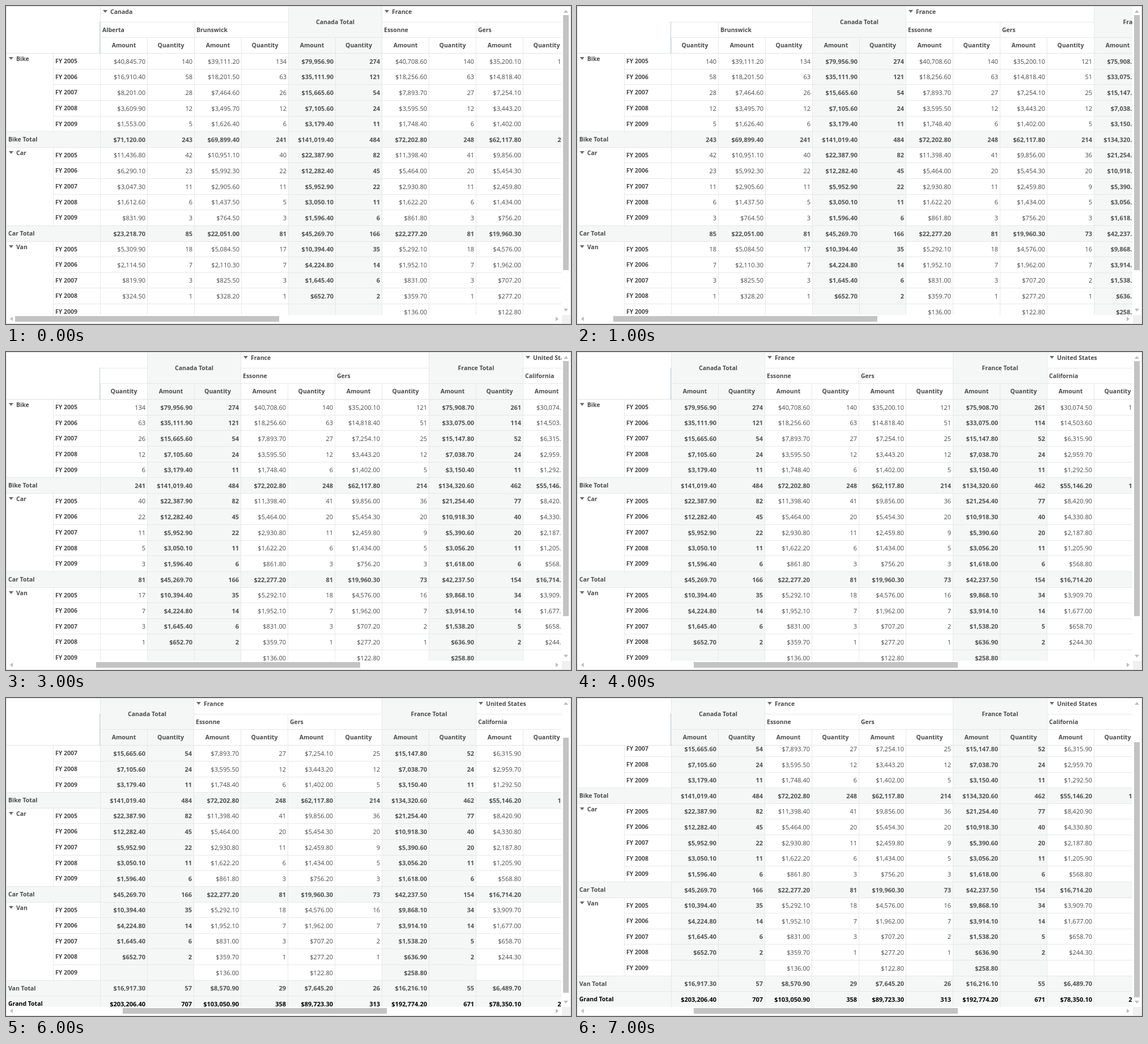
Write an HTML page that moves like this. It is 997x561 px and loops after 8000 ms.

```html
<!DOCTYPE html>
<html lang="en">
<head>
<meta charset="utf-8">
<title>Pivot grid</title>
<style>
html, body { margin: 0; width: 100%; height: 100%; overflow: hidden; background: #fff; }
#grid { position: absolute; left: 0; top: 0; width: 997px; height: 561px; overflow: hidden; background: #fff;
  font: 11px "Open Sans", "Noto Sans", sans-serif; color: #484848; }
#grid * { box-sizing: border-box; }
.pane, .layer, .cell, .bar, .arrow, .line { position: absolute; }
.pane { overflow: hidden; background: #fff; }
.layer { left: 0; top: 0; }
.cell { border: solid #e6e8e7; border-width: 1px 0 0 1px; background: #fff; white-space: nowrap; overflow: hidden; }
.num { text-align: right; padding-right: 3px; }
.mid { text-align: center; }
.left { padding-left: 3px; }
.label { font-size: 10.5px; font-weight: 700; color: #4a4a4a; }
.tint { background: #f5f7f6; }
.sum { font-weight: 700; color: #525252; }
.grand { font-weight: 700; color: #000; }
.fold { padding-left: 17px; }
.fold::before { content: ""; position: absolute; left: 4px; top: 6px;
  border: solid transparent; border-width: 5px 4.5px 0; border-top-color: #6a6a6a; }
.bar { background: #c3c3c3; }
.arrow { border: 4px solid transparent; }
#frame { position: absolute; inset: 0; border: 1px solid #dcdcdc; }
</style>
</head>
<body>
<div id="grid"></div>
<script>
const COL = 82.9, ROW = 27.63, LOOP = 8000, STEPS = 8;
const colX = i => Math.round(i * COL);
const rowY = i => Math.round(i * ROW);
const grid = document.getElementById('grid');

function box(parent, cls, x, y, w, h, text = '') {
  const el = document.createElement('div');
  el.className = cls;
  Object.assign(el.style, { left: x + 'px', top: y + 'px', width: w + 'px', height: h + 'px' });
  el.textContent = text;
  parent.append(el);
  return el;
}

function cell(parent, cls, col, row, cols, rows, text, lineHeight) {
  const x = colX(col), y = rowY(row), w = colX(col + cols) - x, h = rowY(row + rows) - y;
  const el = box(parent, 'cell ' + cls, x, y, w, h, text);
  el.style.lineHeight = (lineHeight || h - 1) + 'px';
}

let seed = 11;
const random = () => (seed = seed * 16807 % 2147483647) / 2147483647;

// Sales decay from each region's opening year; quantity follows from a typical price.
const products = [
  { name: 'Bike', share: 1, decay: 0.45, price: 291 },
  { name: 'Car', share: 0.28, decay: 0.52, price: 275 },
  { name: 'Van', share: 0.13, decay: 0.4, price: 295 }
];
function region(name, opening, vanYears) {
  const amount = products.map((p, i) => Array.from({ length: 5 }, (_, y) => {
    if (i === 2 && y >= vanYears) return 0;
    const noise = y ? 0.92 + random() * 0.16 : 1;
    return Math.round(opening * p.share * p.decay ** y * noise * 10) / 10;
  }));
  const quantity = amount.map((list, i) => list.map(v => Math.ceil(v / products[i].price - 0.5)));
  return { name, amount, quantity };
}
const alberta = region('Alberta', 40845.7, 4);
const brunswick = region('Brunswick', 39111.2, 4);
const essonne = region('Essonne', 40708.6, 5);
const gers = region('Gers', 35200.1, 5);
const california = region('California', 30074.5, 4);
const groups = [
  { name: 'Alberta', parts: [alberta] },
  { name: 'Brunswick', parts: [brunswick] },
  { name: 'Canada Total', parts: [alberta, brunswick], total: true },
  { name: 'Essonne', parts: [essonne] },
  { name: 'Gers', parts: [gers] },
  { name: 'France Total', parts: [essonne, gers], total: true },
  { name: 'California', parts: [california] }
];
const sum = list => list.reduce((a, b) => a + b, 0);
const money = v => '$' + v.toLocaleString('en-US', { minimumFractionDigits: 2, maximumFractionDigits: 2 });

const body = box(grid, 'pane', 166, 83, 814, 462);
const bodyX = box(body, 'layer', 0, 0, 1500, 530);
const bodyY = box(bodyX, 'layer', 0, 0, 1500, 530);
const side = box(grid, 'pane', 0, 83, 166, 462);
const sideY = box(side, 'layer', 0, 0, 166, 530);
const head = box(grid, 'pane', 166, 0, 814, 84);
const headX = box(head, 'layer', 0, 0, 1500, 84);
const corner = box(grid, 'pane', 0, 0, 166, 84);

// Column headings
['Canada', 'France', 'United States'].forEach((name, i) =>
  cell(headX, 'label fold', i * 6, 0, 4, 1, name, 19));
groups.forEach(({ name, total }, g) => {
  const col = g * 2, tint = total ? ' tint' : '';
  if (total) cell(headX, 'label mid tint', col, 0, 2, 2, name);
  else cell(headX, 'label left', col, 1, 2, 1, name);
  ['Amount', 'Quantity'].forEach((text, i) => cell(headX, 'label mid' + tint, col + i, 2, 1, 1, text));
});

// Row headings
products.forEach(({ name }, p) => {
  const row = p * 6;
  cell(sideY, 'label fold', 0, row, 1, 5, name, 19);
  for (let y = 0; y < 5; y++) cell(sideY, 'label left', 1, row + y, 1, 1, 'FY ' + (2005 + y));
  cell(sideY, 'label left tint', 0, row + 5, 2, 1, name + ' Total');
});
cell(sideY, 'label left tint grand', 0, 18, 2, 1, 'Grand Total');

// Values with subtotals
groups.forEach(({ parts, total }, g) => ['amount', 'quantity'].forEach((key, i) => {
  const put = (row, value, cls) => cell(bodyY, 'num ' + cls, g * 2 + i, row, 1, 1,
    value ? (i ? String(value) : money(value)) : '');
  let grand = 0;
  products.forEach((_, p) => {
    const years = [0, 1, 2, 3, 4].map(y => sum(parts.map(r => r[key][p][y])));
    years.forEach((v, y) => put(p * 6 + y, v, total ? 'sum tint' : ''));
    put(p * 6 + 5, sum(years), 'sum tint');
    grand += sum(years);
  });
  put(18, grand, 'grand tint');
}));

// Fixed rules
box(grid, 'line', 0, 83, 981, 1).style.background = '#e2e4e3';
box(corner, 'line', 165, 28, 1, 55).style.borderLeft = '1px dotted #7f9fb5';

// Scroll bars
box(grid, 'pane', 0, 545, 981, 16);
box(grid, 'pane', 981, 0, 16, 545);
box(grid, 'pane', 981, 545, 16, 16).style.background = '#f0f0f0';
const thumbX = box(grid, 'bar', 16, 547, 466, 10);
const thumbY = box(grid, 'bar', 983, 16, 10, 450);
function arrow(x, y, side) {
  const el = box(grid, 'arrow', x - 4, y - 4, 8, 8);
  el.style['border' + side + 'Color'] = '#bdbdbd';
  el.style['border' + side + 'Width'] = '5px';
}
arrow(7, 552, 'Right');
arrow(974, 552, 'Left');
arrow(988, 7, 'Bottom');
arrow(988, 538, 'Top');
box(grid, '', 0, 0, 997, 561).id = 'frame';

// Scroll four columns, then down to the end, one step per second.
const scrollX = step => colX(Math.min(step, 4));
const scrollY = step => Math.min(rowY(Math.max(step - 4, 0)), 63);

function hold(el, axis, position) {
  const frames = Array.from({ length: STEPS + 1 }, (_, i) => ({
    transform: `translate${axis}(${Math.round(position(Math.min(i, STEPS - 1)))}px)`,
    offset: i / STEPS, easing: 'steps(1, end)'
  }));
  el.animate(frames, { duration: LOOP, iterations: Infinity });
}
[headX, bodyX].forEach(el => hold(el, 'X', step => -scrollX(step)));
[sideY, bodyY].forEach(el => hold(el, 'Y', step => -scrollY(step)));
hold(thumbX, 'X', step => scrollX(step) * 0.573);
hold(thumbY, 'Y', step => scrollY(step) * 0.98);
</script>
</body>
</html>
```
